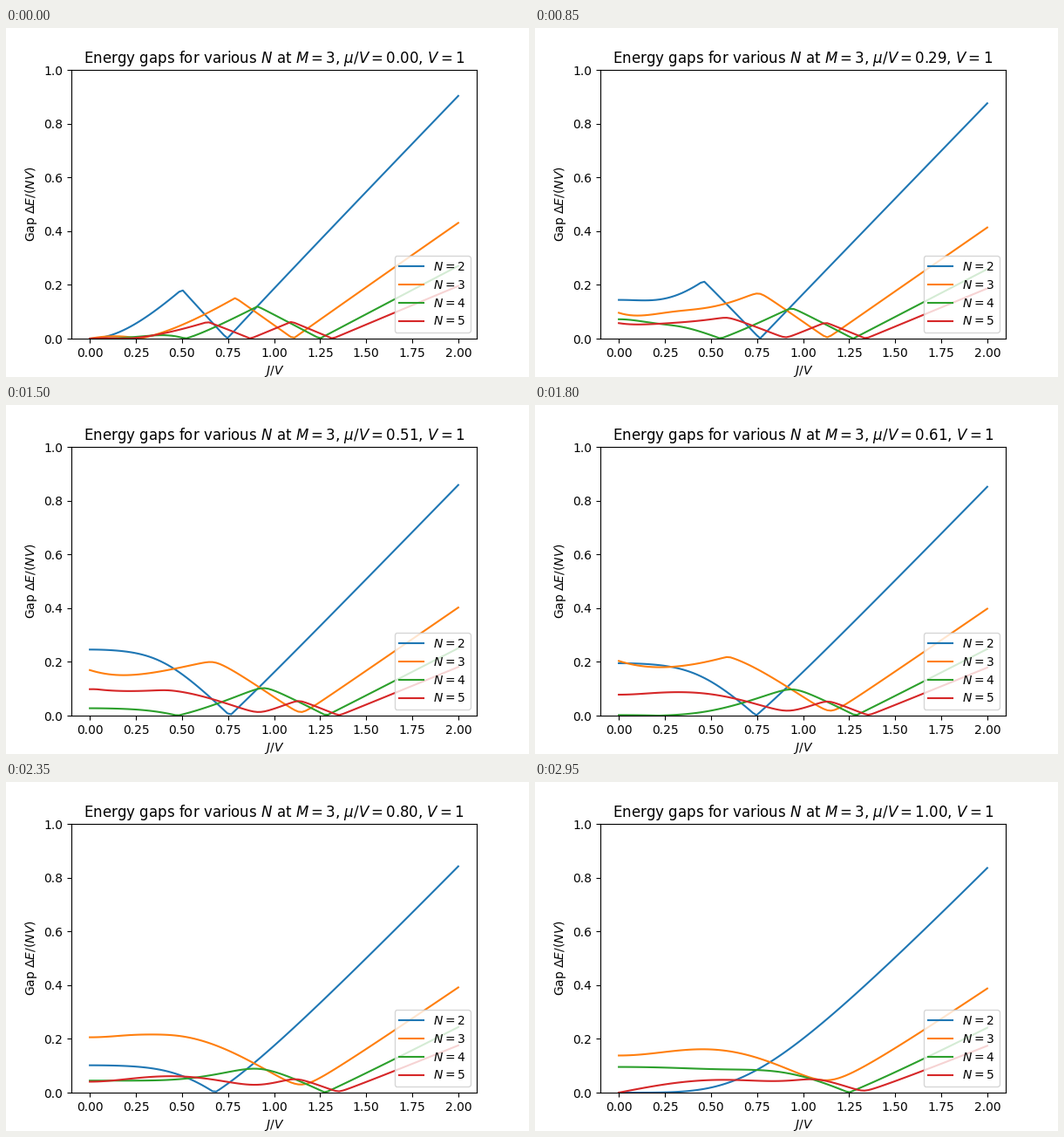
Write a matplotlib script that moves like this. It is 600 by 400 pixels and loops after 3 s.

```python
import numpy as np
import matplotlib.pyplot as plt
from matplotlib.animation import FuncAnimation

M, V = 3, 1.0
SIZES = (2, 3, 4, 5)
FRAMES = 60
J = np.linspace(0, 2, 100)
MU = np.linspace(0, 1, FRAMES)
MAX_BASIS = 50


def on_site(op, i, n):
    """Embed a single-site operator at site i of an n-site chain."""
    return np.kron(np.kron(np.eye(M**i), op), np.eye(M**(n - 1 - i)))


def ladder(m):
    op = np.zeros((M, M))
    op[m, m + 1] = 1
    return op


def build_terms(n):
    """Neighbour exchange, level hopping and edge-level potential."""
    lower = [ladder(m) for m in range(M - 1)]
    hop = sum(lower)
    edge = np.diag([1.0] + [0.0] * (M - 1))
    swap = sum(on_site(a, i, n) @ on_site(a.T, i + 1, n)
               for a in lower for i in range(n - 1))
    return (V * (swap + swap.T),
            -sum(on_site(hop + hop.T, i, n) for i in range(n)),
            -sum(on_site(edge, i, n) for i in range(n)))


def reduce_terms(terms):
    """Project onto the span of low-lying states sampled over (J, mu)."""
    exch, hop, edge = terms
    states = [np.linalg.eigh(exch + j * hop + mu * edge)[1][:, :3]
              for j in 2 * np.linspace(0.02, 1, 11)**1.4
              for mu in np.linspace(0.01, 1, 6)]
    basis = np.linalg.svd(np.hstack(states), full_matrices=False)[0]
    basis = basis[:, :MAX_BASIS]
    return [basis.T @ t @ basis for t in terms]


def gap_table(n):
    """Gap per site, one row for each mu and one column for each J."""
    terms = build_terms(n)
    if M**n > MAX_BASIS:
        terms = reduce_terms(terms)
    exch, hop, edge = terms
    along_j = exch + J[:, None, None] * hop
    levels = np.array([np.linalg.eigvalsh(along_j + mu * edge)[:, :2]
                       for mu in MU])
    return (levels[..., 1] - levels[..., 0]) / (n * V)


gaps = {n: gap_table(n) for n in SIZES}

fig, ax = plt.subplots(figsize=(6, 4), dpi=100)
lines = {n: ax.plot(J / V, gaps[n][0], label=f"$N={n}$")[0] for n in SIZES}
ax.set_ylim(0, 1)
ax.set_xlabel("$J/V$")
ax.set_ylabel(r"Gap $\Delta E/(NV)$")
ax.legend(loc="lower right")
title = ax.set_title("")


def update(frame):
    for n, line in lines.items():
        line.set_ydata(gaps[n][frame])
    title.set_text(rf"Energy gaps for various $N$ at $M={M}$, "
                   rf"$\mu/V={MU[frame] / V:.2f}$, $V={V:.0f}$")
    return [*lines.values(), title]


anim = FuncAnimation(fig, update, frames=FRAMES, interval=50, repeat=True)
plt.show()
```
